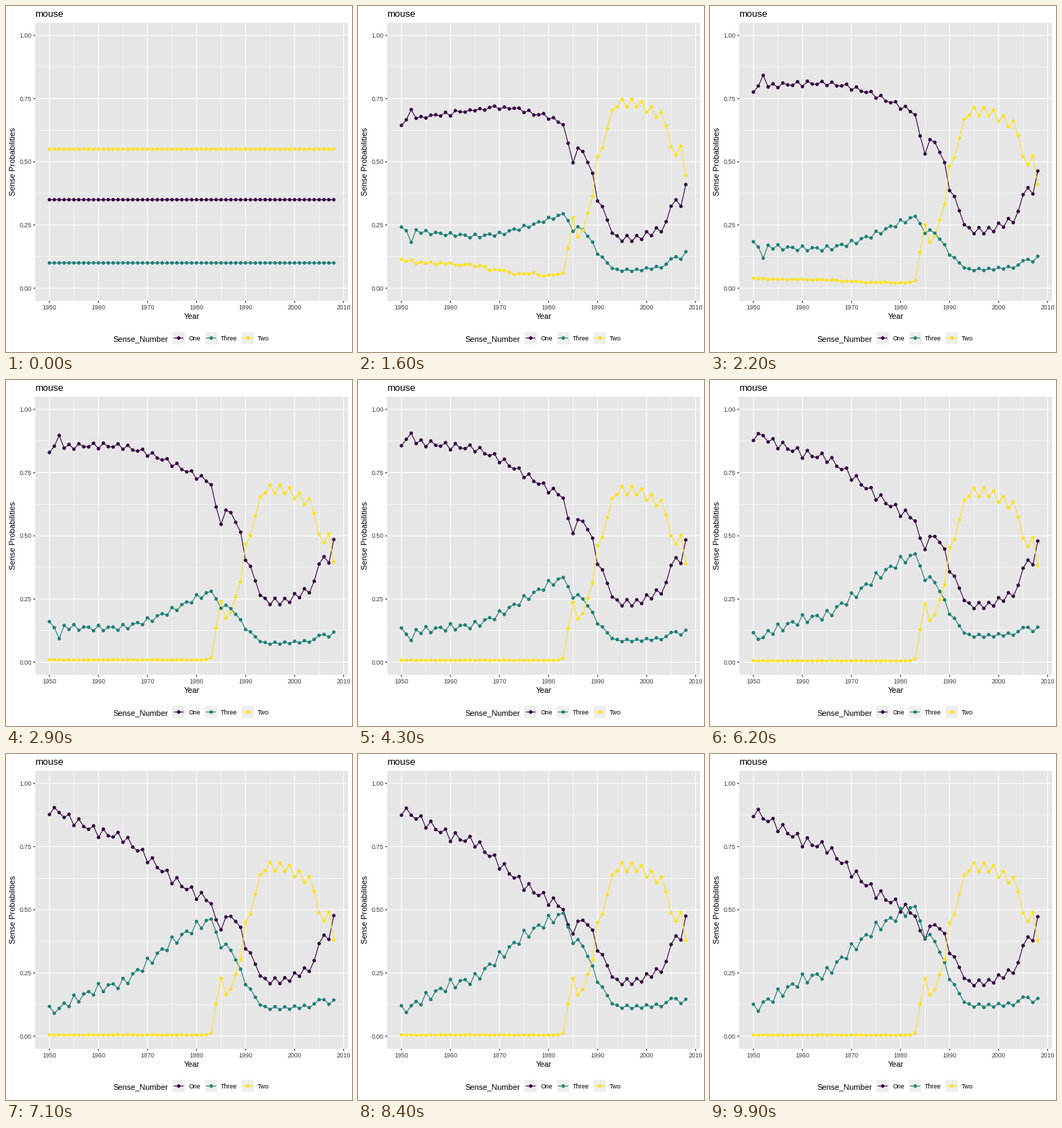
Recreate the animation shown at these times as a matplotlib script. Size 480 by 480 pixels, loop 10 s.

```python
import numpy as np
import matplotlib.pyplot as plt
from matplotlib.animation import FuncAnimation
from matplotlib.patches import Rectangle

plt.rcParams["font.family"] = "Liberation Sans"

SIZE, DPI = 480, 72
LEFT, RIGHT, TOP, BOTTOM = 40.5, 474.5, 23.3, 409.0
COLORS = {"One": "#340042", "Three": "#1F7F79", "Two": "#FDE31E"}
PANEL, KEY, TICK, LABEL = "#E6E6E6", "#EEEEEE", "#262626", "#404040"
YEARS = np.arange(1950, 2009)
OLD = YEARS < 1984


def px(year):
    return LEFT + (year - 1947.1) / 63.8 * (RIGHT - LEFT)


def py(prob):
    return BOTTOM - (prob + 0.05) / 1.1 * (BOTTOM - TOP)


def through(years, values):
    return np.interp(YEARS, years, values)


rng = np.random.default_rng(4)
noise = rng.uniform(-1, 1, len(YEARS)) * OLD

# Sense Two: nearly absent until 1983, then a rise with a two-year zigzag
zigzag = np.where(YEARS % 2, 1, -1) * (YEARS >= 1995)
two_end = 0.017 * zigzag + 0.001 * noise + through(
    [1982, 1983, 1984, 1985, 1986, 1987, 1989, 1990, 1991, 1993,
     1995, 1998, 2003, 2004, 2005, 2007, 2008],
    [0.004, 0.012, 0.127, 0.228, 0.163, 0.185, 0.302, 0.449, 0.482, 0.637,
     0.668, 0.668, 0.612, 0.588, 0.47, 0.472, 0.395])


def two_near_end(gap):
    return two_end + gap * (two_end * (1 - two_end) + 0.06 * OLD)


two_early = two_near_end(0.29) + 0.006 * noise + through(
    [1950, 1965, 1972, 1983, 1984], [0.085, 0.064, 0.038, 0.025, 0])

# Sense Three: its share of whatever sense Two leaves, with a five-year beat
bends = [1950, 1955, 1960, 1965, 1970, 1975, 1980,
         1984, 1989, 1993, 1998, 2004, 2008]
beat = np.cos(0.8 * np.pi * YEARS) * OLD
dip = 0.055 * (YEARS == 1952)
share_early = 0.008 * beat - dip + through(
    bends, [0.265, 0.245, 0.235, 0.225, 0.23, 0.255, 0.287,
            0.318, 0.286, 0.265, 0.265, 0.265, 0.26])
share_low = 0.012 * beat - dip + through(
    bends, [0.15, 0.138, 0.135, 0.138, 0.165, 0.206, 0.257,
            0.29, 0.246, 0.235, 0.24, 0.22, 0.197])
share_end = 0.022 * beat + through(
    bends, [0.105, 0.165, 0.225, 0.25, 0.345, 0.43, 0.485,
            0.522, 0.418, 0.37, 0.36, 0.322, 0.24])
sag = through([1970, 1980], [0.096, 0])


def late(w):
    """Senses Two and Three on the slow drift, w from 0 to 1."""
    two = two_near_end(0.075 * (1 - w) ** 1.5)
    share = share_low + w * (share_end - share_low) - w * (1 - w) * sag
    return np.array([two, share * (1 - two)])


flat = np.array([[0.55], [0.10]]) * np.ones(len(YEARS))
early = np.array([two_early, share_early * (1 - two_early)])


def senses(t):
    if t < 1.6:
        u = max(0, (t - 0.5) / 1.1)
        two, three = flat + u * (early - flat)
    elif t < 2.9:
        rest = ((2.9 - t) / 1.3) ** 2
        two, three = late(0) + rest * (early - late(0))
    else:
        two, three = late(np.interp(t, [2.9, 4.3, 5.4, 7.1, 9.9],
                                    [0, 0.235, 0.5, 0.785, 1]))
    return {"One": 1 - two - three, "Three": three, "Two": two}


fig = plt.figure(figsize=(SIZE / DPI, SIZE / DPI), dpi=DPI, facecolor="white")
ax = fig.add_axes([0, 0, 1, 1])
ax.set_xlim(0, SIZE)
ax.set_ylim(SIZE, 0)
ax.axis("off")


def box(x, y, w, h, color):
    ax.add_patch(Rectangle((x, y), w, h, fc=color, ec="none",
                           snap=False, zorder=0))


def rule(x, y, color="white", width=1.07, z=1):
    return ax.plot(x, y, color=color, lw=width, solid_capstyle="butt",
                   snap=False, zorder=z)[0]


def points(x, y, color, z):
    return ax.scatter(x, y, s=4.85 ** 2, color=color, edgecolors="none",
                      linewidths=0, zorder=z)


def text(x, y, s, size, color="black", **kw):
    ax.text(x, y, s, fontsize=size, color=color, **kw)


box(LEFT, TOP, RIGHT - LEFT, BOTTOM - TOP, PANEL)

for year in range(1955, 2010, 10):
    rule([px(year)] * 2, [TOP, BOTTOM], width=0.53)
for p in np.arange(0.125, 1, 0.25):
    rule([LEFT, RIGHT], [py(p)] * 2, width=0.53)
for year in range(1950, 2011, 10):
    x = px(year)
    rule([x, x], [TOP, BOTTOM])
    rule([x, x], [BOTTOM, BOTTOM + 2.74], TICK)
    text(x, 421.2, str(year), 8.8, LABEL, ha="center")
for p in np.arange(0, 1.01, 0.25):
    y = py(p)
    rule([LEFT, RIGHT], [y, y])
    rule([LEFT - 2.74, LEFT], [y, y], TICK)
    text(35.6, y + 3.3, f"{p:.2f}", 8.8, LABEL, ha="right")

text(40.5, 15, "mouse", 13.2)
text((LEFT + RIGHT) / 2, 434, "Year", 11, ha="center")
text(13.3, (TOP + BOTTOM) / 2, "Sense Probabilities", 11, rotation=90,
     ha="center", va="baseline", rotation_mode="anchor")

text(148.7, 465, "Sense_Number", 11)
for name, x in zip(COLORS, (231, 276, 327)):
    box(x, 452, 17.28, 17.28, KEY)
    rule([x + 1.7, x + 15.5], [460.6] * 2, COLORS[name], z=2)
    points([x + 8.64], [460.6], COLORS[name], 3)
    text(x + 22.3, 463.9, name, 8.8)

lines = {name: rule([], [], color, z=4) for name, color in COLORS.items()}
dots = {name: points([], [], color, 5) for name, color in COLORS.items()}


def draw(i):
    for name, p in senses(i / 10).items():
        xy = np.column_stack([px(YEARS), py(p)])
        lines[name].set_data(*xy.T)
        dots[name].set_offsets(xy)
    return [*lines.values(), *dots.values()]


anim = FuncAnimation(fig, draw, frames=100, interval=100, repeat=True,
                     repeat_delay=0, blit=False)
plt.show()
```
